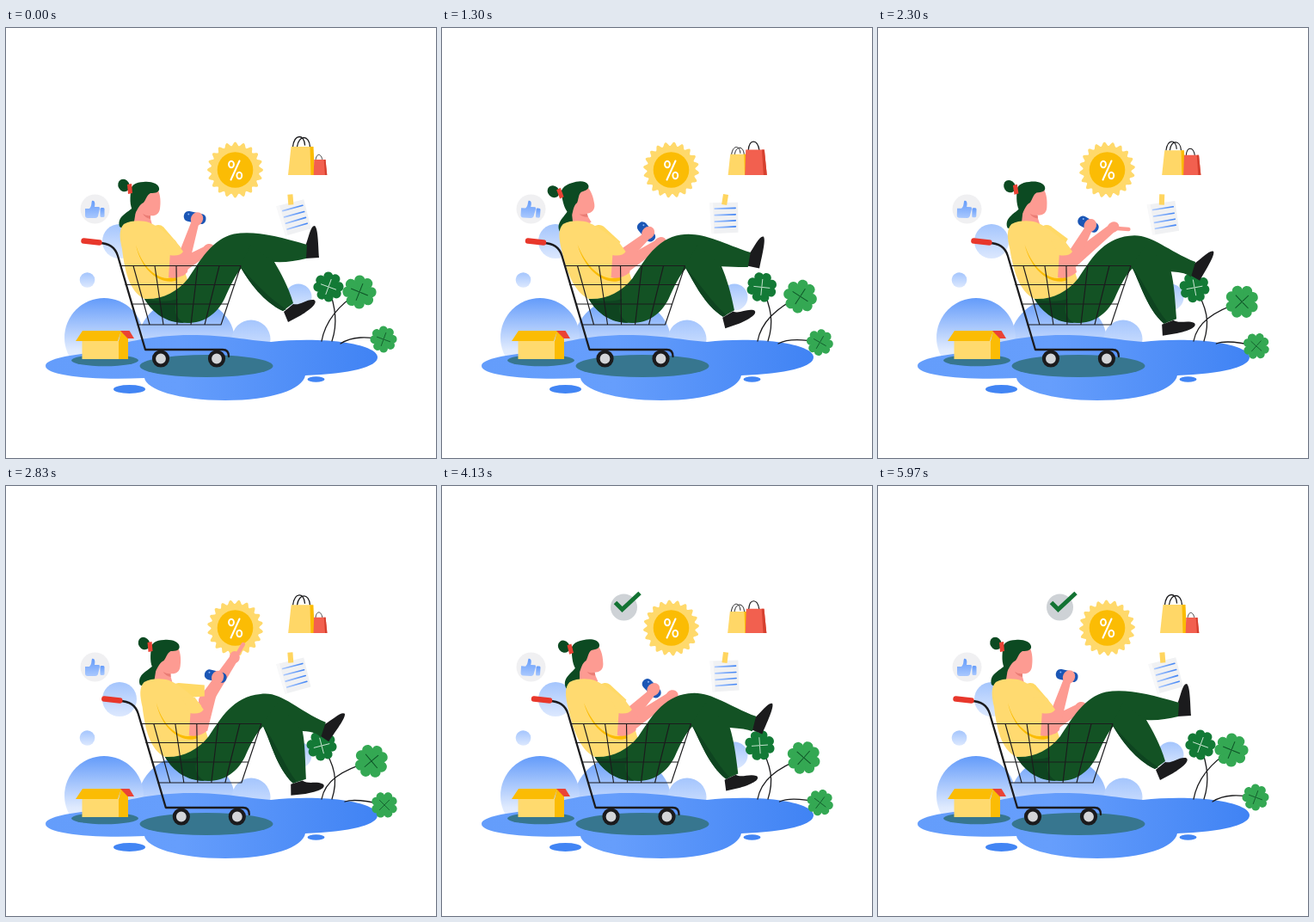
Write an HTML page that moves like this. It is 500 px wide and 500 px high and loops after 6000 ms.

```html
<!DOCTYPE html>
<html lang="en">
<head>
<meta charset="utf-8">
<title>Shopping cart</title>
<style>
html, body { margin: 0; width: 100%; height: 100%; overflow: hidden; background: #fff; }
svg { display: block; width: 100vw; height: 100vh; }
.line { fill: none; stroke: #1b1b1d; stroke-linecap: round; stroke-linejoin: round; }
.skin { fill: #fd9b92; }
.hair { fill: #0c4a22; }
.pants { fill: #135224; }
.shade { fill: #0e4420; }
.shoe { fill: #1b1b1d; }
</style>
</head>
<body>
<svg viewBox="0 0 500 500">
  <defs>
    <linearGradient id="hill" x1="0" y1="0" x2="0" y2="1">
      <stop offset="0" stop-color="#639bfa"/><stop offset=".65" stop-color="#dfeafe"/><stop offset="1" stop-color="#f3f7ff"/>
    </linearGradient>
    <linearGradient id="bubble" x1="0" y1="0" x2="0" y2="1">
      <stop offset="0" stop-color="#a4c5fd"/><stop offset="1" stop-color="#dce8fe"/>
    </linearGradient>
    <linearGradient id="water">
      <stop offset="0" stop-color="#649dfb"/><stop offset=".4" stop-color="#669efc"/><stop offset="1" stop-color="#4083f4"/>
    </linearGradient>
    <linearGradient id="thumb" x1="0" y1="0" x2="0" y2="1">
      <stop offset="0" stop-color="#659cfa"/><stop offset="1" stop-color="#a9c8fe"/>
    </linearGradient>
    <linearGradient id="ink">
      <stop offset="0" stop-color="#a8c7fe"/><stop offset="1" stop-color="#4285f4"/>
    </linearGradient>
  </defs>

  <g fill="url(#hill)">
    <ellipse cx="210" cy="364" rx="56" ry="50"/>
    <circle cx="114" cy="360" r="46"/>
  </g>
  <g fill="url(#bubble)">
    <circle cx="285" cy="362" r="22.500"/>
    <circle cx="132" cy="248" r="20"/>
    <circle cx="94.500" cy="293" r="8.800"/>
    <circle cx="340" cy="313" r="15.500"/>
  </g>

  <path fill="url(#water)" d="M46 393C46 384 78 380 105 377C130 366 170 357 215 357C255 357 280 363 308 365C335 362 372 362 396 366C420 370 432 376 432 383C432 394 400 402 348 404C345 420 310 433 255 433C200 433 163 420 161 407C100 410 46 404 46 393Z"/>
  <g fill="#4285f4">
    <ellipse cx="143.500" cy="420" rx="18.500" ry="5"/>
    <ellipse cx="360.500" cy="408.500" rx="10" ry="3.200"/>
  </g>
  <g fill="#37768f">
    <ellipse cx="233" cy="393" rx="77.500" ry="13"/>
    <ellipse cx="115" cy="386.500" rx="39" ry="6.800"/>
  </g>

  <path fill="#ffda6e" d="M88.500 364H132V385H88.500Z"/>
  <path fill="#fbbc04" d="M81 364L89 352H134L130 364ZM131 364L134 352L142 361V385H131Z"/>
  <path fill="#ea4335" d="M133 352H143.500L149 361H141.500Z"/>

  <circle cx="103.500" cy="210.500" r="17" fill="#f0f0f2"/>
  <g id="like" fill="url(#thumb)">
    <path d="M92 210H97C100 207 99 204 100 201C103 200 104 204 103 208H108Q109 208 109 210L107 219Q106 221 104 221H95Q92 221 92 218Z"/>
    <rect x="109.500" y="209" width="5" height="11" rx="1.500"/>
  </g>

  <g transform="translate(266.500 165)">
    <path id="badge" fill="#ffd96b"/>
    <circle r="20.800" fill="#fbbc04"/>
    <g fill="none" stroke="#fff" stroke-width="2" stroke-linecap="round">
      <path d="M5 -10.500L-5 11.500"/>
      <ellipse cx="-4.500" cy="-6.500" rx="2.900" ry="3.800"/>
      <ellipse cx="4.800" cy="6.500" rx="2.900" ry="3.800"/>
    </g>
  </g>

  <g id="yellowBag">
    <path class="line" stroke-width="1.300" d="M-10 -33C-8 -48 3 -48 4 -35M-5 -33C-3 -47 9 -47 10 -33"/>
    <path fill="#ffd767" d="M-12 -33H12L15.500 0H-15.500Z"/>
    <path fill="#fbbc04" d="M10 -33H14L15.500 0H11Z"/>
  </g>
  <g id="redBag">
    <path class="line" stroke-width="1.300" d="M-9 -29C-8 -43 2 -43 4 -29"/>
    <path fill="#f2604f" d="M-12 -30H10L13 0H-13Z"/>
    <path fill="#d6402f" d="M7 -30H10L13 0H9Z"/>
  </g>

  <g id="note">
    <path fill="#f0f1f3" d="M-18 3H15V38L-16 39Z"/>
    <path fill="#fff" opacity=".5" d="M-18 3H-14L-13 39H-16Z"/>
    <path stroke="url(#ink)" stroke-width="1.600" stroke-linecap="round" d="M-12 10L12 9.500M-12 17.500L12 17M-12 25L12 24M-12 32L12 31"/>
    <path fill="#ffd55f" d="M-2 -7L4 -6L2 6L-4 5Z"/>
  </g>

  <g id="check">
    <circle r="15.500" fill="#ced2d6"/>
    <path d="M-10 -5.500L-2 2.500L18.500 -16.500" fill="none" stroke="#137333" stroke-width="5"/>
  </g>

  <path id="stems" class="line" stroke-width="1.300"/>
  <g id="clovers"></g>

  <g id="rider">
    <g id="farShoe"><path class="shoe" d="M-2 -7C2 -17 4 -31 9 -31C13 -28 13 -8 14 6L-2 7Z"/></g>
    <g id="head">
      <path class="hair" d="M151 203C148 214 128 216 132 231C138 236 153 236 162 224L164 205Z"/>
      <path class="skin" d="M153 200L176 187C180 194 180 203 179 210C178 217 173 219 167 218L170 229Q158 233 149 225Z"/>
      <path fill="#ea7d75" d="M159 216Q164 219 168 218L168 222Q162 221 159 216Z"/>
      <path class="hair" d="M145 191C144 183 151 179 160 179C169 178 177 181 178 186C179 191 174 192 168 192C164 194 163 199 160 203C155 205 153 211 150 216C144 210 144 200 145 191Z"/>
      <ellipse class="hair" cx="137" cy="183" rx="6.500" ry="7.500" transform="rotate(-30 137 183)"/>
      <path fill="#ea4335" d="M141 182L146 181L147 192L142 193Z"/>
    </g>
    <path id="farArm" class="skin"/>
    <g id="finger"><ellipse class="skin" rx="6" ry="7"/><path d="M3 -3L10 -15" stroke="#fd9b92" stroke-width="4.500" stroke-linecap="round"/></g>
    <path id="farSleeve" fill="#ffd966"/>
    <path id="torso" fill="#ffda70"/>
    <path id="fold" fill="#fbbc04"/>
    <g id="phone">
      <rect x="-13" y="-6.500" width="26" height="12" rx="5.500" fill="#1b56b5"/>
      <circle cx="-8" cy="-3" r="1" fill="#8ab4f8"/>
    </g>
    <path id="nearArm" class="skin"/>
    <ellipse id="hand" class="skin" rx="7" ry="8"/>
    <path id="sleeve" fill="#ffda70"/>

    <path id="farLeg" class="pants"/>
    <path class="shade" d="M161 315C178 319 190 318 200 315C194 327 196 336 207 343C187 343 171 332 161 315Z"/>
    <path id="nearLeg" class="pants"/>
    <path id="calf" class="shade"/>
    <g id="nearShoe"><path class="shoe" d="M-5 3L6 -6C14 -4 21 -12 30 -11C36 -8 25 1 15 7L0 15Z"/></g>

    <g class="line">
      <path id="basket" stroke-width="1.150"/>
      <path stroke-width="2.300" d="M108 250C120 250 127 255 130 265L162 374H252Q259 374 259 382"/>
    </g>
    <path d="M90.500 247.500L108.500 249.500" stroke="#e8372b" stroke-width="6.500" stroke-linecap="round"/>
    <g fill="#d3d5d8" stroke="#1b1b1d" stroke-width="4.200">
      <circle cx="180" cy="384.500" r="8"/><circle cx="245" cy="384.500" r="8"/>
    </g>
  </g>
</svg>
<script>
const LOOP = 6000;
const el = id => document.getElementById(id);
const mix = (a, b, k) => a + (b - a) * k;
const wave = x => (1 - Math.cos(2 * Math.PI * x)) / 2;
const smooth = (t, a, b) => {
  const k = Math.min(1, Math.max(0, (t - a) / (b - a)));
  return k * k * (3 - 2 * k);
};
const path = (id, d) => el(id).setAttribute('d', d);
const place = (id, x, y, angle = 0, scale = 1) =>
  el(id).setAttribute('transform', `translate(${x} ${y}) rotate(${angle}) scale(${scale})`);

// Limb that narrows from width w1 to w2, with a round start.
function limb(x1, y1, w1, x2, y2, w2) {
  const len = Math.hypot(x2 - x1, y2 - y1) || 1;
  const nx = -(y2 - y1) / len / 2, ny = (x2 - x1) / len / 2;
  return `M${x1 + nx * w1} ${y1 + ny * w1}A${w1 / 2} ${w1 / 2} 0 0 1 ${x1 - nx * w1} ${y1 - ny * w1}` +
    `L${x2 - nx * w2} ${y2 - ny * w2}L${x2 + nx * w2} ${y2 + ny * w2}Z`;
}

function cog(teeth, radius, depth) {
  let d = '';
  for (let i = 0; i <= 360; i++) {
    const a = i * Math.PI / 180;
    const r = radius - depth * wave(i * teeth / 360);
    d += `${i ? 'L' : 'M'}${(r * Math.cos(a)).toFixed(2)} ${(r * Math.sin(a)).toFixed(2)}`;
  }
  return d + 'Z';
}

function clover(id, color, vein) {
  const leaf = 'M0 0C-5 -4 -13 -9 -9.500 -15C-7 -18.500 -2 -18.500 0 -15.500C2 -18.500 7 -18.500 9.500 -15C13 -9 5 -4 0 0Z';
  const leaves = [0, 90, 180, 270].map(a =>
    `<g transform="rotate(${a})"><path d="${leaf}" fill="${color}"/><path d="M0 0V-10" stroke="${vein}" stroke-width=".9"/></g>`);
  return `<g id="${id}">${leaves.join('')}</g>`;
}

function basket() {
  let d = 'M133 276.500H273L250 345H153';
  for (const [y, x1, x2] of [[298.500, 139, 266], [321, 146, 258]]) d += `M${x1} ${y}H${x2}`;
  for (let i = 0; i < 5; i++) d += `M${148 + i * 25} 276.500L${167 + i * 16} 345`;
  return d;
}

path('badge', cog(20, 32.5, 4.5));
path('basket', basket());
el('clovers').innerHTML = clover('cloverA', '#137a36', '#d9eedf') +
  clover('cloverB', '#34a853', '#0d5226') + clover('cloverC', '#34a853', '#0d5226');

function drawLegs(roll) {
  const kneeX = 265 + 7 * roll, kneeY = 239.5 + 2.5 * roll;
  const notchX = 312 + 9 * roll, notchY = 272 + 13 * roll;
  const farX = 350 - 2 * roll, farY = 252 + 23 * roll;
  const heelX = 322 - 12 * roll, heelY = 329 + 17 * roll;
  const backX = 272 + 2 * roll;

  path('farLeg', `M161 315C182 316 199 307 212 291C226 270 240 245 ${kneeX} ${kneeY}` +
    `C${kneeX + 24} ${kneeY - 4} ${farX - 35} ${farY - 10 - 5 * roll} ${farX} ${farY}` +
    `L${farX - 1 - 5 * roll} ${farY + 16 + 2 * roll}Q${notchX + 18} ${notchY + 1} ${notchX} ${notchY}` +
    `L${backX + 4} 277C266 287 260 302 254 315C245 333 230 343 211 343C188 343 171 332 161 315Z`);
  path('nearLeg', `M${backX} 277C${283 + roll} 296 ${300 - 10 * roll} ${319 + 8 * roll} ${heelX} ${heelY}` +
    `L${heelX + 12 + 3 * roll} ${heelY - 9 + 4 * roll}` +
    `C${328 - 4 * roll} ${300 + 18 * roll} ${320 + 4 * roll} ${286 + 14 * roll} ${notchX} ${notchY}L${kneeX + 20} 252Z`);
  path('calf', `M${backX} 277C${283 + roll} 296 ${300 - 10 * roll} ${319 + 8 * roll} ${heelX} ${heelY}` +
    `L${heelX + 4} ${heelY - 2}C${308 - 8 * roll} ${316 + 10 * roll} ${291 - roll} 298 ${backX} 277Z`);
  place('farShoe', 350 - 6 * roll, 261 + 23 * roll, 38 * roll);
  place('nearShoe', 328 - 15 * roll, 327 + 19 * roll, 22 * roll);
}

function drawRider(t, roll, swing) {
  const point = smooth(t, 2130, 2730) * (1 - smooth(t, 3130, 3700));
  place('rider', 24 * roll, 0);

  const lean = -6 * swing;
  const tilt = -swing * (24 - 20 * roll);
  el('head').setAttribute('transform', `translate(${lean} 0) rotate(${tilt} 158 228)`);

  path('torso', `M${137 + lean} 228C${146 + lean} 223 ${160 + lean} 224 ${166 + lean} 226` +
    `C${180 + lean} 232 ${197 + lean / 2} 246 ${206 + lean / 2} 259L192 265L191 286L208 283L211 293` +
    `C199 308 181 317 161 315C143 306 ${138 + lean / 2} 282 ${135 + lean} 257C${132 + lean} 244 ${131 + lean} 234 ${137 + lean} 228Z`);
  path('fold', `M${151 + lean / 2} 252C157 274 171 290 188 291L197 289L199 293C184 300 158 286 ${151 + lean / 2} 252Z`);

  const shift = lean / 3;
  const handX = 221 + 8.5 * swing, handY = 222 + 17 * swing;
  path('nearArm', `M${191 + shift} 260L${205 + shift} 258L${211 + shift} 284Q${200 + shift} 293 ${189 + shift} 290Z` +
    limb(203 + shift, 280 - 15 * swing, 17, handX - 1, handY + 4, 9));
  path('sleeve', `M${180 + shift} 245L${196 + shift} 246L${206 + shift} 260Q${202 + shift} 266 ${190 + shift} 264Z`);
  place('hand', handX + 1, handY, 25 + 25 * swing);
  place('phone', handX - 1.5, handY - 1, 12 + 40 * swing);

  const tipX = mix(236 + 22 * roll, 242, point), tipY = mix(257 - 20 * roll, 199, point);
  path('farArm', limb(mix(204, 208, point), mix(276, 250, point), 16, tipX, tipY, 10));
  place('finger', tipX, tipY, mix(80, 0, point));
  path('farSleeve', limb(177 + lean * .7, 238, 18, mix(194, 207, point), mix(254, 238, point), 13));

  drawLegs(roll);
}

function drawPlants(roll) {
  const ax = 375 - 8 * roll, ay = 301 + roll;
  const bx = 411 + 14 * roll, by = 307 + 13 * roll;
  const cx = 439 + roll, cy = 362 + 9 * roll;
  place('cloverA', ax, ay, 20 - 35 * roll, .95);
  place('cloverB', bx, by, 22 + 28 * roll, 1.06);
  place('cloverC', cx, cy, 20 + 25 * roll, .84);
  path('stems', `M379 364C386 343 383 325 ${ax} ${ay}M367 364C371 343 ${385 + 4 * roll} ${323 + 8 * roll} ${bx} ${by}` +
    `M${389 + 5 * roll} 367C403 ${358 + 6 * roll} 420 ${359 + 7 * roll} ${cx} ${cy}`);
}

function draw(t) {
  const roll = wave(t / LOOP);
  const swing = wave(2 * t / LOOP);
  drawRider(t, roll, swing);
  drawPlants(roll);
  el('badge').setAttribute('transform', `rotate(${360 * t / LOOP})`);
  place('yellowBag', 343.5 + .5 * swing, 171, 0, 1 - .28 * swing);
  place('redBag', 365.5 - .5 * swing, 171, 0, .6 + .4 * swing);
  place('note', mix(331, 329, swing), 200, -14 * (1 - swing));
  el('like').setAttribute('transform', `rotate(${4 * swing} 103 211)`);
  place('check', 211.5, 141, 0, smooth(t, 2900, 3150));
}

const start = performance.now();
function tick() {
  draw((performance.now() - start) % LOOP);
  requestAnimationFrame(tick);
}
tick();
</script>
</body>
</html>
```
